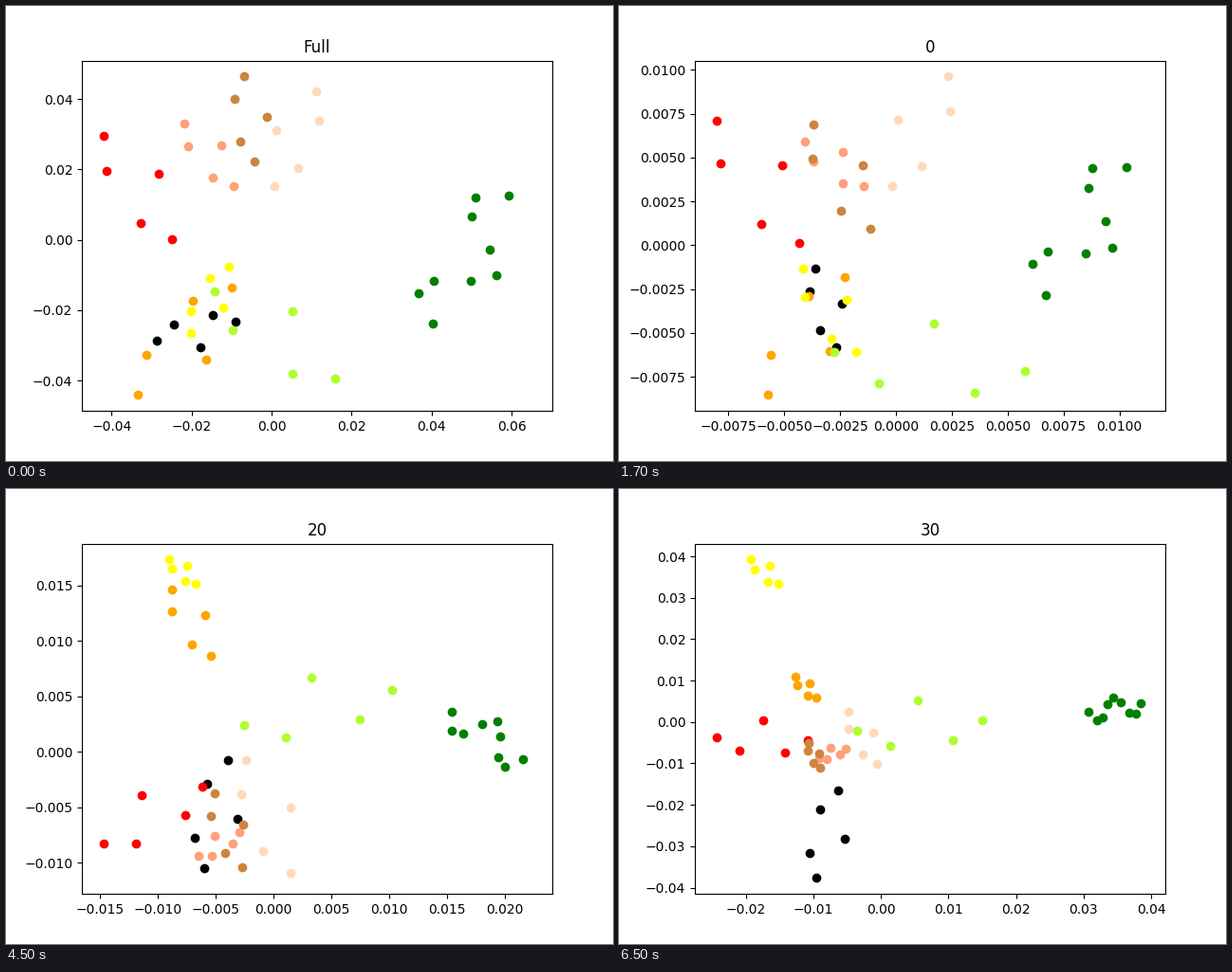
Write a matplotlib script that moves like this. It is 640 px wide and 480 px high and loops after 8000 ms.

```python
import numpy as np
import matplotlib.pyplot as plt
from matplotlib.animation import FuncAnimation

WIDTH, HEIGHT, DPI = 640, 480, 100
LEFT, RIGHT, TOP, BOTTOM = 80, 576, 57.6, 427.2
INTERVAL, FRAMES = 500, 16
SWING = 0.2  # sideways sway of a cluster, relative to its length

# Clusters in drawing order; a layout gives each one's two end points.
COLORS = ["peachpuff", "black", "red", "lightsalmon", "peru",
          "orange", "yellow", "greenyellow", "green"]

whole = [
    (283 + 190j, 327 + 90j), (242 + 333j, 159 + 353j),
    (103 + 137j, 175 + 246j), (188 + 124j, 240 + 190j),
    (251 + 74j, 262 + 164j), (238 + 297j, 139 + 410j),
    (235 + 275j, 195 + 345j), (220 + 301j, 347 + 393j),
    (530 + 200j, 450 + 335j),
]
early = [
    (288 + 190j, 347 + 74j), (207 + 277j, 229 + 360j),
    (103 + 121j, 190 + 250j), (196 + 143j, 258 + 190j),
    (205 + 125j, 265 + 235j), (238 + 286j, 157 + 410j),
    (194 + 277j, 250 + 365j), (227 + 365j, 428 + 385j),
    (535 + 170j, 450 + 305j),
]
middle = [
    (253 + 286j, 300 + 405j), (234 + 286j, 209 + 400j),
    (103 + 374j, 207 + 314j), (203 + 387j, 246 + 362j),
    (220 + 321j, 249 + 399j), (175 + 106j, 216 + 176j),
    (172 + 74j, 200 + 100j), (251 + 249j, 407 + 212j),
    (470 + 235j, 545 + 285j),
]
late = [
    (242 + 235j, 272 + 290j), (231 + 318j, 208 + 410j),
    (103 + 262j, 199 + 265j), (211 + 284j, 239 + 274j),
    (200 + 268j, 212 + 294j), (186 + 198j, 208 + 220j),
    (139 + 74j, 168 + 100j), (251 + 255j, 383 + 244j),
    (495 + 235j, 550 + 226j),
]

# Title, layout, x origin and scale, y origin and scale (pixels per unit).
PANELS = [
    ("Full", whole, 280.0, 4220, 246.6, 3715),
    ("0", early, 291.85, 23570, 252.35, 18490),
    ("10", early, 289.35, 19500, 247.1, 15960),
    ("20", middle, 282.1, 12200, 277.2, 11690),
    ("30", late, 276.3, 7117, 245.8, 4368),
]

fig = plt.figure(figsize=(WIDTH / DPI, HEIGHT / DPI), dpi=DPI)
ax = fig.add_axes([LEFT / WIDTH, 1 - BOTTOM / HEIGHT,
                   (RIGHT - LEFT) / WIDTH, (BOTTOM - TOP) / HEIGHT])


def cluster(start, end, count):
    """Spread points from start to end, swaying to both sides."""
    t = np.linspace(0, 1, count)
    return start + (end - start) * (t + 1j * SWING * np.sin(3 * np.pi * t))


def draw(frame):
    # The first panel stays for one tick, the others for four.
    title, layout, x0, x_scale, y0, y_scale = PANELS[(frame + 3) // 4]
    ax.clear()
    for color, (start, end) in zip(COLORS, layout):
        points = cluster(start, end, 9 if color == "green" else 5)
        ax.scatter((points.real - x0) / x_scale,
                   (y0 - points.imag) / y_scale, color=color)
    ax.set_xlim((LEFT - x0) / x_scale, (RIGHT - x0) / x_scale)
    ax.set_ylim((y0 - BOTTOM) / y_scale, (y0 - TOP) / y_scale)
    ax.set_title(title)


anim = FuncAnimation(fig, draw, frames=FRAMES, interval=INTERVAL,
                     init_func=lambda: draw(0), repeat=True, repeat_delay=0)
plt.show()
```
